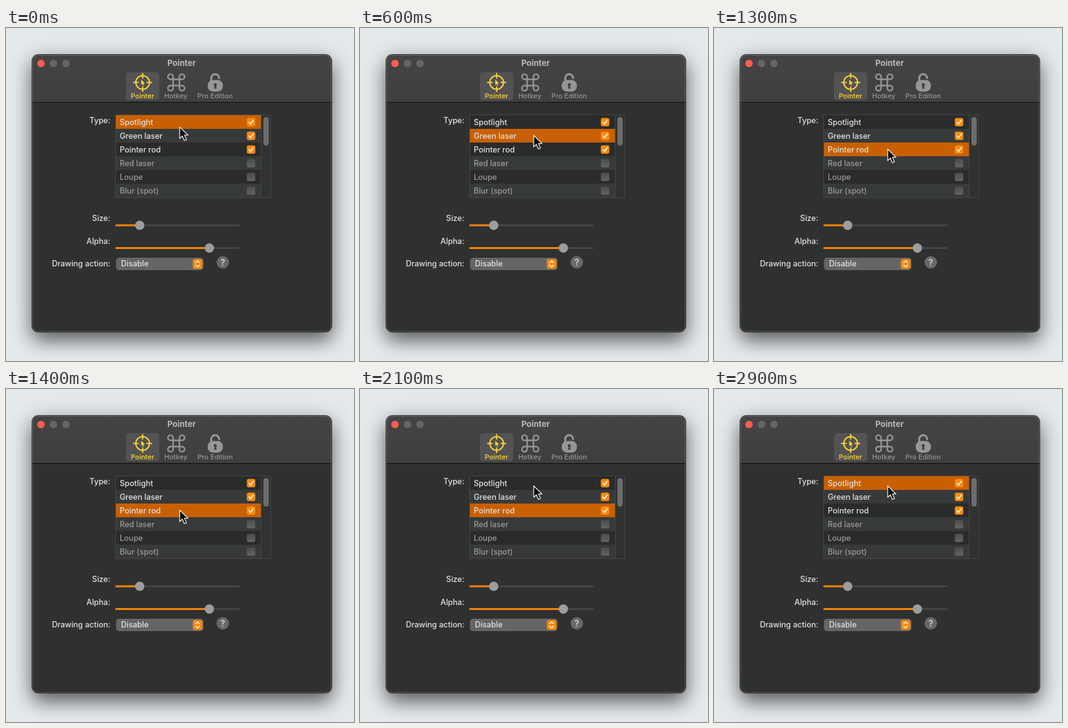
These frames come from a looping animation (557x535 px, 3000 ms). An HTML page:

```html
<!DOCTYPE html>
<html lang="en">
<head>
<meta charset="utf-8">
<title>Pointer settings</title>
<style>
  html, body { margin: 0; width: 100%; height: 100%; overflow: hidden; background: #e4e9eb; }
  #window {
    position: absolute; left: 42px; top: 43px; width: 479px; height: 445px;
    border-radius: 10px; background: #2f3130;
    box-shadow: 0 0 0 1px rgba(0, 0, 0, .75), 0 14px 30px rgba(0, 0, 0, .55), 0 4px 42px rgba(0, 0, 0, .15);
  }
  svg { position: absolute; left: 0; top: 0; }
  text { font: 500 12.5px Inter, sans-serif; fill: #e2e2e2; }
  .label { text-anchor: end; }
  .tab text { font-size: 11px; text-anchor: middle; fill: #969696; }
  .tab .active { fill: #fdd43e; }
  .off { fill: #989a9a; }
  .line { fill: none; stroke-linecap: round; stroke-linejoin: round; }
</style>
</head>
<body>
<div id="window"></div>
<svg width="557" height="535" viewBox="0 0 557 535">
  <defs>
    <linearGradient id="bar" x2="0" y2="1">
      <stop stop-color="#444444"/><stop offset="1" stop-color="#3e3f3e"/>
    </linearGradient>
    <linearGradient id="box" x2="0" y2="1">
      <stop stop-color="#4b4d4d"/><stop offset="1" stop-color="#626464"/>
    </linearGradient>
  </defs>

  <path d="M42 119V53a10 10 0 0 1 10-10H511a10 10 0 0 1 10 10V119z" fill="url(#bar)"/>
  <path d="M42 119.5H521" stroke="#0c0c0c"/>
  <rect x="42.5" y="43.5" width="478" height="444" rx="9.5" fill="none" stroke="#fff" stroke-opacity=".22"/>
  <circle cx="56" cy="57" r="6" fill="#fd5b55"/>
  <circle cx="76" cy="57" r="6" fill="#656565"/>
  <circle cx="96" cy="57" r="6" fill="#656565"/>
  <text x="281" y="61" text-anchor="middle" style="font-size:13px;font-weight:700;fill:#b9b9b9">Pointer</text>

  <g class="tab">
    <rect x="192" y="71" width="53.5" height="45" rx="5" fill="#525352"/>
    <g class="line" stroke="#fdd43e" stroke-width="1.9">
      <circle cx="218.7" cy="87.5" r="11"/>
      <path d="M218.7 73v7.5M218.7 94.500v7.500M204.200 87.500h7.500M225.700 87.500h7.500"/>
    </g>
    <path d="M216.500 83v8.500l2-1.800 1.300 2.800 1.300-.6-1.300-2.800h2.700z" fill="#fdd43e"/>
    <path class="line" stroke="#969696" stroke-width="2.4"
      d="M267.500 82.500h10v10h-10zM267.500 82.500v-4a4.200 4.200 0 1 0-4.200 4zM277.500 82.500h4a4.200 4.200 0 1 0-4-4.200zM277.500 92.500v4a4.200 4.200 0 1 0 4.200-4zM267.500 92.500h-4a4.200 4.200 0 1 0 4 4.200z"/>
    <path class="line" stroke="#969696" stroke-width="3.2" d="M328.500 87V80.500a6.300 6.300 0 0 1 12.600 0"/>
    <rect x="322.800" y="83.500" width="24.400" height="18.800" rx="8.500" fill="#969696"/>
    <path d="M335 88.500a2.600 2.600 0 0 1 1.300 4.800l.8 4.200h-4.200l.8-4.200a2.600 2.600 0 0 1 1.300-4.800z" fill="#414141"/>
    <text class="active" x="218.500" y="113">Pointer</text>
    <text x="271.700" y="113">Hotkey</text>
    <text x="334.700" y="113">Pro Edition</text>
  </g>

  <g class="label">
    <text x="167" y="153">Type:</text>
    <text x="167" y="309.500">Size:</text>
    <text x="167" y="346.500">Alpha:</text>
    <text x="167" y="383">Drawing action:</text>
  </g>

  <rect x="175.500" y="139.500" width="248" height="133" fill="#2a2b2b" stroke="#454747"/>
  <g id="rows"></g>
  <rect x="409" y="140" width="14" height="132" fill="#303232"/>
  <path d="M408.500 140v132" stroke="#454747"/>
  <rect x="412" y="143" width="8.500" height="46" rx="4.200" fill="#6c6e6e"/>
  <g id="sliders"></g>

  <rect x="176" y="369" width="140" height="20" rx="5" fill="#646666"/>
  <rect x="299" y="371" width="15.500" height="16" rx="4" fill="#fb8708"/>
  <path class="line" stroke="#fff" stroke-width="1.500" d="M303.700 377l3-3 3 3M303.700 381l3 3 3-3"/>
  <text x="184" y="383">Disable</text>
  <circle cx="347" cy="376.500" r="10" fill="#686a6a"/>
  <text x="347" y="381.500" text-anchor="middle" style="font-size:14px">?</text>

  <path id="cursor" d="M0 0V18.500l4.300-4 3.200 7.400 3.400-1.400-3.200-7.300h5.600z"
    fill="#0b0b0b" stroke="#e8e8e8" stroke-width="1.300" stroke-linejoin="round"/>
</svg>
<script>
  const names = ['Spotlight', 'Green laser', 'Pointer rod', 'Red laser', 'Loupe', 'Blur (spot)'];
  const enabledCount = 3;

  document.getElementById('rows').innerHTML = names.map((name, i) => {
    const y = 140 + 22 * i, enabled = i < enabledCount;
    return `<rect class="row" x="176" y="${y}" width="232.500" height="${Math.min(22, 272 - y)}"/>
      <text x="182" y="${y + 16}" class="${enabled ? '' : 'off'}">${name}</text>
      <rect x="385.500" y="${y + 4.5}" width="13.500" height="13.500" rx="3" fill="${enabled ? '#fc8a0c' : 'url(#box)'}"/>
      ${enabled ? `<path class="line" stroke="#fff" stroke-width="1.700" d="M389 ${y + 11.5}l2.400 2.900 4.300-6.200"/>` : ''}`;
  }).join('');

  document.getElementById('sliders').innerHTML = [[317, 214], [353.5, 325.5]].map(([y, x]) =>
    `<g class="line" stroke-width="3"><path stroke="#434646" d="M176.500 ${y}H372.500"/>
     <path stroke="#fa8606" d="M176.500 ${y}H${x}"/></g>
     <circle cx="${x}" cy="${y}" r="7.500" fill="#9c9d9d"/>`).join('');

  const rows = document.querySelectorAll('.row');
  const cursor = document.getElementById('cursor');

  // Cursor moves: start, end, from, to
  const moves = [[0, 500, 159, 172.5], [600, 1100, 172.5, 194.5], [1400, 2100, 194.5, 155.5], [2900, 3000, 155.5, 155.5]];

  function cursorY(time) {
    const [start, end, from, to] = moves.filter(move => move[0] <= time).pop();
    const p = Math.min(1, (time - start) / (end - start));
    return from + (to - from) * p * p * (3 - 2 * p);
  }

  function selectedRow(time) {
    return time < 600 || time >= 2400 ? 0 : time < 1300 ? 1 : 2;
  }

  function draw(now) {
    const time = Math.floor(now % 3000 / 100) * 100;
    const selected = selectedRow(time);
    rows.forEach((row, i) => row.setAttribute('fill', i === selected ? '#c86000' : i % 2 ? '#373a3b' : '#2a2b2b'));
    cursor.setAttribute('transform', `translate(278 ${cursorY(time)})`);
  }

  const begin = performance.now();
  function tick() {
    draw(performance.now() - begin);
    requestAnimationFrame(tick);
  }
  tick();
</script>
</body>
</html>
```
